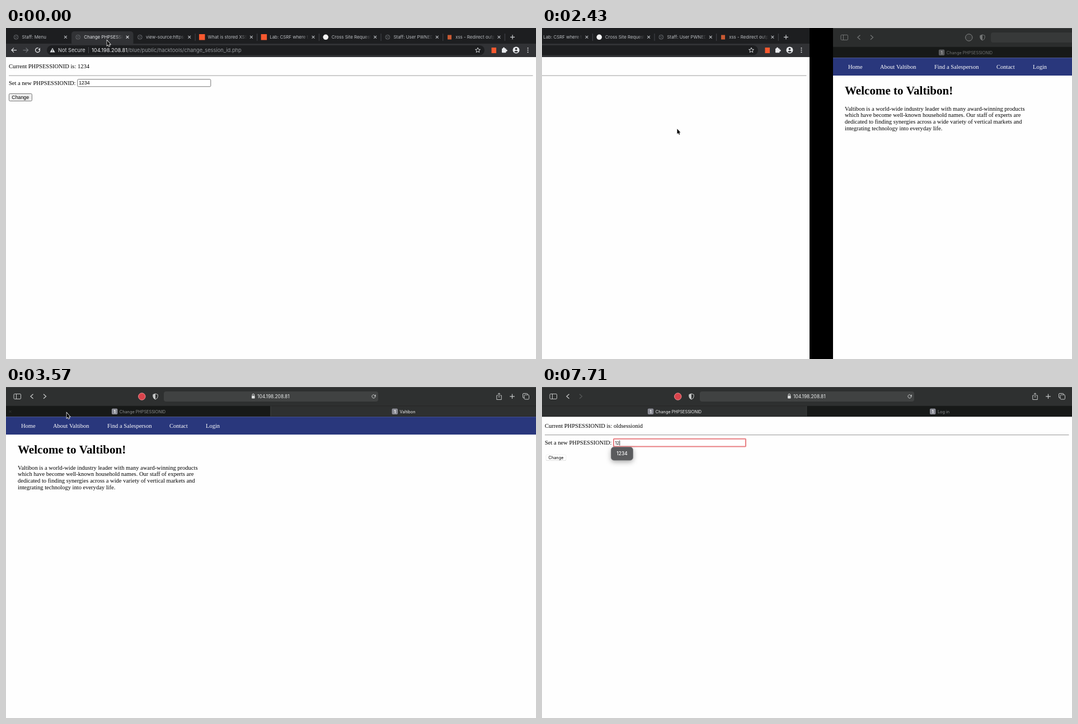
Animation of 947 by 592 pixels, one loop 8000 ms. Source, as an HTML page with a canvas:

```html
<!DOCTYPE html>
<html lang="en">
<head>
<meta charset="utf-8">
<title>Session ID demo</title>
<style>
html, body { margin: 0; width: 100%; height: 100%; overflow: hidden; background: #000; }
canvas { display: block; }
</style>
</head>
<body>
<canvas id="stage" width="947" height="592"></canvas>
<script>
const W = 947, H = 592, LOOP = 8000, STEP = 1000 / 7, GAP = 42;
const ctx = document.getElementById('stage').getContext('2d');
const SERIF = '"Liberation Serif", serif', SANS = '"Liberation Sans", sans-serif', UI = 'Inter, sans-serif';
const BODY = `10.52px ${SERIF}`, HEAD = `bold 21.04px ${SERIF}`, SMALL = `7.3px ${UI}`;
const PAPER = '#fefefe', ORANGE = '#f8592f';

// Pointer path: time, x, y
const PATH = [
  [0, 180, 22], [290, 150, 88], [570, 85, 150], [1000, 85, 150], [1290, 62, 158], [2000, 241, 180],
  [2710, 241, 180], [3570, 108, 46], [4000, 235, 95], [4570, 363, 70], [4860, 363, 70], [5140, 343, 83],
  [5710, 297, 49], [6000, 295, 48], [6290, 290, 44], [6860, 260, 16], [7000, 178, 96], [7140, 111, 87]
];

function pointerAt(t) {
  const i = PATH.findIndex(p => p[0] > t);
  if (i < 0) return PATH[PATH.length - 1].slice(1);
  const [t0, x0, y0] = PATH[i - 1], [t1, x1, y1] = PATH[i];
  const u = (t - t0) / (t1 - t0), e = u * u * (3 - 2 * u);
  return [x0 + (x1 - x0) * e, y0 + (y1 - y0) * e];
}

function rect(x, y, w, h, fill) {
  ctx.fillStyle = fill;
  ctx.fillRect(x, y, w, h);
}

function box(x, y, w, h, r, fill, stroke, line = 1) {
  ctx.beginPath();
  ctx.roundRect(x, y, w, h, r);
  if (fill) { ctx.fillStyle = fill; ctx.fill(); }
  if (stroke) { ctx.strokeStyle = stroke; ctx.lineWidth = line; ctx.stroke(); }
}

function disc(x, y, r, fill, stroke) {
  box(x - r, y - r, 2 * r, 2 * r, r, fill, stroke);
}

function text(s, x, y, font, fill = '#000', align = 'left') {
  ctx.font = font;
  ctx.fillStyle = fill;
  ctx.textAlign = align;
  ctx.fillText(s, x, y);
}

function path(d, x, y, stroke, line = 1.2, fill) {
  const p = new Path2D(d);
  ctx.save();
  ctx.translate(x, y);
  if (stroke) { ctx.strokeStyle = stroke; ctx.lineWidth = line; ctx.stroke(p); }
  if (fill) { ctx.fillStyle = fill; ctx.fill(p); }
  ctx.restore();
}

const cross = (x, y, r, color, line = 1) => path(`M${-r} ${-r}L${r} ${r}M${r} ${-r}L${-r} ${r}`, x, y, color, line);
const plus = (x, y, r, color) => path(`M${-r} 0H${r}M0 ${-r}V${r}`, x, y, color);

function reload(x, y, r, color, line) {
  ctx.strokeStyle = color;
  ctx.lineWidth = line;
  ctx.beginPath();
  ctx.arc(x, y, r, -0.5, 5.1);
  ctx.stroke();
  path(`M${r + 0.6} ${-r - 0.4}V-0.4H${r - 3.2}Z`, x, y, null, 1, color);
}

function globe(x, y, color) {
  disc(x, y, 4, null, color);
  path('M-3-1.5Q0-2 0 0T3 2M-3 1.5Q-1 1-1 3M1-3Q1-1 3-1', x, y, color, 0.9);
}

const TABS = [
  ['Staff: Menu'], ['Change PHPSESSIONID'], ['view-source:https://'],
  ['What is stored XSS', ORANGE], ['Lab: CSRF where the'], ['Cross Site Request'],
  ['Staff: User PWNED'], ['xss - Redirect output']
];

function chromeWindow(mx, my) {
  rect(0, 0, W, H, PAPER);
  rect(0, 0, W, 52, '#1d1e20');
  box(117, 6, 110.5, 26, 5, '#313235');
  rect(0, 28, W, 24, '#313235');
  TABS.forEach(([title], i) => {
    const x = 18 + i * 110.65, active = i === 1;
    if (i === 3 || i === 4) rect(x - 5, 11, 10.5, 10.5, ORANGE);
    else if (i === 5) disc(x, 16.3, 4.8, '#f4f4f4');
    else if (i === 7) rect(x - 3.5, 12.5, 7, 8, '#c95a33');
    else globe(x, 16.3, '#5d6064');
    const fade = ctx.createLinearGradient(x + 68, 0, x + 81, 0);
    fade.addColorStop(0, active ? '#e4e6e9' : '#b9bcc0');
    fade.addColorStop(1, 'rgba(185,188,192,0)');
    text(title, x + 10.6, 19.2, `7.9px ${UI}`, fade);
    cross(x + 88.4, 16.3, 2.4, active ? '#e4e6e9' : '#b9bcc0', 1.1);
    if (i > 1) rect(x + 98.3, 10, 1, 13, '#46484c');
  });
  plus(905, 16.3, 4, '#cfd1d4');

  path('M5 0H-4M0-4L-4 0L0 4', 14, 39.6, '#e3e5e8', 1.3);
  path('M-5 0H4M0-4L4 0L0 4', 35.5, 39.6, '#75787c', 1.3);
  reload(56.5, 39.6, 3.9, '#e3e5e8', 1.3);
  box(73, 31, 782, 17.5, 8.7, '#1d1e20');
  path('M0-4L4.5 4H-4.5Z', 83, 39.4, null, 1, '#e0e2e5');
  rect(82.5, 38, 1, 2.8, '#1d1e20');
  rect(82.5, 41.5, 1, 1, '#1d1e20');
  text('Not Secure', 93, 43, `9.2px ${UI}`, '#d9dbde');
  rect(147, 34, 1, 11, '#4b4d51');
  const font = `9.3px ${UI}`, host = '104.198.208.81';
  text(host, 153, 43, font, '#f0f1f3');
  text('/blue/public/hacktools/change_session_id.php', 153 + ctx.measureText(host).width, 43, font, '#94979b');
  path('M0-4.5L1.3-1.4L4.5-1.2L2 .9L2.8 4L0 2.3L-2.8 4L-2 .9L-4.5-1.2L-1.3-1.4Z', 843, 39.6, '#d0d2d5', 1);
  rect(867.5, 35, 8.5, 10, ORANGE);
  box(886, 36.5, 7.5, 7.8, 1, '#e8eaed');
  disc(889.5, 36.2, 1.7, '#e8eaed');
  disc(894, 40.2, 1.7, '#e8eaed');
  disc(911.5, 39.6, 6, '#e8eaed');
  disc(911.5, 37.6, 1.9, '#313235');
  path('M-3.6 3Q0-.8 3.6 3Q0 5.6-3.6 3Z', 911.5, 39.6, null, 1, '#313235');
  for (const dy of [-3.6, 0, 3.6]) disc(932.5, 39.6 + dy, 1, '#e3e5e8');

  text('Current PHPSESSIONID is: 1234', 5, 72, BODY);
  rect(5, 84.5, 936.5, 1.3, '#b4b4b4');
  text('Set a new PHPSESSIONID:', 5, 101.5, BODY);
  const over = mx > 127 && mx < 366 && my > 91 && my < 106;
  box(127.8, 91.8, 238, 13, 1.5, '#fff', over ? '#333' : '#767676');
  text('1234', 130.2, 101.4, `8.77px ${SANS}`);
  box(5.4, 117.4, 41, 13.2, 2, '#efefef', '#767676');
  text('Change', 10.3, 127, `8.77px ${SANS}`);
}

function safariTab(x, title, active, live) {
  const color = !live ? '#717373' : active ? '#eee' : '#8d8f8f';
  ctx.font = SMALL;
  const left = x - (ctx.measureText(title).width + 14) / 2;
  box(left, 38.5, 10.5, 10.5, 2, live ? '#8a8b94' : '#5b5c5e');
  text('1', left + 5.2, 46.6, `600 7.5px ${UI}`, live ? '#fff' : '#b0b0b0', 'center');
  text(title, left + 14, 46.5, SMALL, color);
}

function safariField(x, y, w, h) {
  box(x, y, w, h, 0.5, '#fff', '#f1f1f3', 0.8);
  rect(x, y + h - 0.5, w, 1, '#c6c6d0');
}

function safariButton(label, x, y, w) {
  box(x, y + 0.8, w, 10.3, 2.5, '#cfcfcf');
  box(x, y, w, 10.3, 2.5, '#fff', '#e8e8e8', 0.6);
  text(label, x + w / 2, y + 8, SMALL, '#000', 'center');
}

function homePage() {
  [['Home', 27], ['About Valtibon', 84], ['Find a Salesperson', 181], ['Contact', 292], ['Login', 357]]
    .forEach(([s, x]) => text(s, x, 73, BODY, '#fff'));
  text('Welcome to Valtibon!', 21, 119, HEAD);
  ['Valtibon is a world-wide industry leader with many award-winning products',
   'which have become well-known household names. Our staff of experts are',
   'dedicated to finding synergies across a wide variety of vertical markets and',
   'integrating technology into everyday life.']
    .forEach((s, i) => text(s, 21, 147.5 + i * 11.9, BODY));
}

function loginPage() {
  text('Public Site', 27, 73, BODY, '#fff');
  text('Log in', 21, 119, HEAD);
  ['Username:', 'Password:'].forEach((s, i) => {
    text(s, 21, 147.5 + i * 27, BODY);
    safariField(22.5, 151 + i * 27, 96.5, 12.5);
  });
  safariButton('Submit', 23, 194, 34);
}

function sessionPage(t) {
  text('Current PHPSESSIONID is: oldsessionid', 5, 72.6, BODY);
  rect(5, 85.2, 936.5, 1, '#959595');
  text('Set a new PHPSESSIONID:', 5, 103, BODY);
  safariButton('Change', 7, 121, 36);
  safariField(129, 93.5, 234, 12);
  const typed = t >= 7710 ? '12' : t >= 7570 ? '1' : 'oldsessionid';
  const font = `7.3px ${UI}`;
  ctx.font = font;
  const width = ctx.measureText(typed).width;
  if (t >= 7000) {
    box(128, 92.8, 236, 13.6, 1, '#fff', '#e98084', 2);
    if (t < 7570) rect(130, 95, width + 1, 10, '#f6c9ca');
  }
  text(typed, 130.5, 102.6, font);
  if (t < 7570) return;
  rect(131 + width, 95.5, 0.8, 9, '#000');
  ctx.save();
  ctx.shadowColor = 'rgba(0,0,0,.35)';
  ctx.shadowBlur = 10;
  ctx.shadowOffsetY = 3;
  box(123.5, 107.5, 39, 23.5, 5, '#5a5b5d');
  ctx.restore();
  box(123.5, 107.5, 39, 23.5, 5, null, '#737476', 0.8);
  text('1234', 143, 121.9, `500 8.4px ${UI}`, '#fff', 'center');
}

function safariWindow(t, mx, my) {
  const live = t >= 3140, session = t >= 5860, login = t >= 5000;
  const loading = t >= 4860 && t < 5430;
  const icon = live ? '#c6c8c8' : '#727474', bar = live ? '#2e3030' : '#2b2d2d';
  rect(0, 0, W, H, PAPER);
  rect(0, 0, W, 53, bar);
  rect(0, 0, W, 1, '#454747');
  rect(session ? 473 : 0, 34, session ? 474 : 472.5, 18.5, '#171918');
  rect(0, 33.6, W, 0.6, '#202121');
  rect(472.5, 34, 0.8, 19, '#414343');
  rect(0, 52.4, W, 0.8, '#1c1d1d');

  box(14, 12.4, 12.5, 9, 1.5, null, icon);
  rect(18, 12.4, 1, 9, icon);
  path('M2.5-4L-2 0L2.5 4', 46, 16.8, icon, 1.3);
  path('M-2.5-4L2 0L-2.5 4', 69.5, 16.8, login ? '#565858' : icon, 1.3);
  disc(242.8, 17, 6.2, live ? '#d9434b' : '#343636', live ? '#ee9296' : '#858787');
  path('M0-5L4.2-3.5V0Q4 3.6 0 5.2Q-4 3.6-4.2 0V-3.5Z', 267, 17, icon, 1);
  path('M0-5V5.2Q-4 3.6-4.2 0V-3.5Z', 267, 17, null, 1, icon);
  box(282, 8, 383, 18, 4, live ? '#404242' : '#373939');
  box(439, 15.6, 5.6, 5, 0.8, '#dcdede');
  path('M-1.7 0V-1.6A1.7 1.7 0 0 1 1.7-1.6V0', 441.8, 15.6, '#dcdede', 1);
  text('104.198.208.81', 449, 19.8, `8.4px ${UI}`, '#eceeee');
  if (loading) {
    cross(657, 16.6, 2.8, '#d0d2d2', 1.1);
    rect(283.5, 24.8, t < 5140 ? 32 : t < 5290 ? 47 : 380, 1.4, '#e0595f');
  } else {
    reload(657, 16.8, 3.1, icon, 1);
  }
  path('M-2-2H-4.2V5.5H4.2V-2H2M0 2V-6M-2.2-4L0-6.2L2.2-4', 881, 17, icon, 1);
  plus(904.5, 16.8, 4.3, icon);
  box(923.5, 11.5, 8.5, 8, 1.5, null, icon);
  box(926, 14, 8.5, 8, 1.5, bar, icon);

  if (mx < 473 && my >= 34 && my < 53 && live) cross(7.5, 44, 2, session ? '#a5a7a7' : '#353737', 0.9);
  safariTab(237, 'Change PHPSESSIONID', session, live);
  safariTab(710.5, login ? 'Log in' : 'Valtibon', !session, live);

  if (session) return sessionPage(t);
  rect(0, 53.2, W, 31.9, '#29377c');
  login ? loginPage() : homePage();
}

function pointer(t, x, y) {
  if (t >= 7570) return;
  if (t >= 7000) path('M0 0Q2 0 2 1.5V9Q2 10.5 0 10.5M4 0Q2 0 2 1.5M2 9Q2 10.5 4 10.5', x, y, '#222', 0.9);
  else path('M.5.2V9.4L2.5 7.6L3.9 10.8L5.3 10.2L4 7.1H6.4Z', x, y, '#fff', 1.5, '#000');
}

function layer(x, paint) {
  ctx.save();
  ctx.translate(x, 0);
  ctx.beginPath();
  ctx.rect(0, 0, W, H);
  ctx.clip();
  paint();
  ctx.restore();
}

function draw(now) {
  const t = Math.round(Math.floor((now % LOOP + 5) / STEP) * STEP / 10) * 10 % LOOP;
  const [mx, my] = pointerAt(t);
  const slide = t < 2430 ? W + GAP : Math.round(137 * Math.exp((2570 - t) / 105));
  rect(0, 0, W, H, '#000');
  if (slide > GAP) layer(slide - W - GAP, () => chromeWindow(mx, my));
  if (slide < W) layer(slide, () => safariWindow(t, mx, my));
  pointer(t, mx, my);
}

const start = performance.now();
function tick() {
  draw(performance.now() - start);
  requestAnimationFrame(tick);
}
tick();
</script>
</body>
</html>
```
